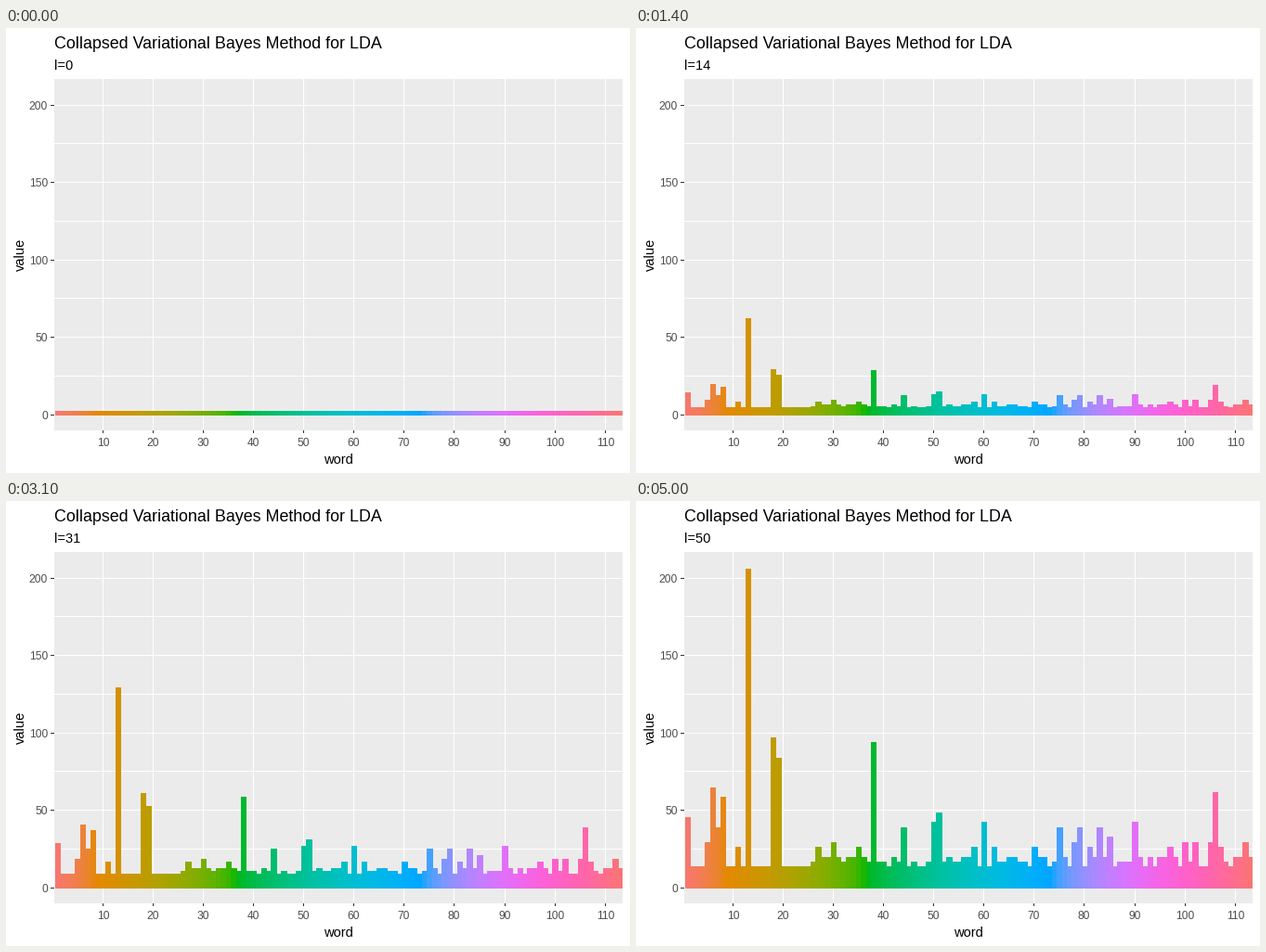
Write a matplotlib script that moves like this. It is 672x480 px and loops after 5.1 s.

```python
import numpy as np
import matplotlib.pyplot as plt
from matplotlib.animation import FuncAnimation
from matplotlib.patches import Rectangle

W, H, DPI = 672, 480, 96
LEFT, RIGHT, TOP, BOTTOM = 52, 664, 55, 434
ZERO_Y, UNIT = 417.2, 1.67
X0, STEP = 50.0, 5.4115
N, LAST = 113, 50

# Words that stand out, grouped by how often they occur
FREQUENT = {
    61: [13], 27: [18], 26: [38], 23: [19], 17: [6], 16: [106], 15: [8],
    12: [51], 11: [1], 10: [50, 60, 90], 9: [7, 44, 75, 79, 83], 7: [85],
    6: [5, 30, 78, 100, 102, 105, 112],
    5: [11, 27, 35, 58, 62, 70, 81, 97, 107],
}


def word_counts():
    """Rare words occur one to three times, the first ones only once."""
    rng = np.random.default_rng(4)
    counts = rng.integers(1, 4, N)
    counts[:25] = 1
    for count, words in FREQUENT.items():
        counts[np.array(words) - 1] = count
    return counts


COUNTS = word_counts()


def hcl(hue, chroma=100, lum=65):
    """Polar LUV to clipped sRGB."""
    h = np.radians(hue)
    y = ((lum + 16) / 116) ** 3
    u = chroma * np.cos(h) / (13 * lum) + 0.1978398
    v = chroma * np.sin(h) / (13 * lum) + 0.4683363
    x = 9 * y * u / (4 * v)
    z = -x / 3 - 5 * y + 3 * y / v
    rgb = np.array([
        3.240479 * x - 1.537150 * y - 0.498535 * z,
        -0.969256 * x + 1.875992 * y + 0.041556 * z,
        0.055648 * x - 0.204043 * y + 1.057311 * z,
    ])
    rgb = np.clip(rgb, 0, 1)
    return np.where(rgb > 0.00304, 1.055 * rgb ** (1 / 2.4) - 0.055, 12.92 * rgb)


def values(step):
    """A flat start, then steady growth in proportion to the counts."""
    if step == 0:
        return np.full(N, 2.6)
    base = 1.3 + 0.246 * step
    gain = 0.12 + 0.0593 * step + 0.00005 * step ** 2
    return base + gain * (COUNTS - 1)


def y_pos(value):
    return ZERO_Y - UNIT * value


plt.rcParams["font.family"] = "Liberation Sans"
fig = plt.figure(figsize=(W / DPI, H / DPI), dpi=DPI, facecolor="white")
ax = fig.add_axes([0, 0, 1, 1])
ax.set_xlim(0, W)
ax.set_ylim(H, 0)
ax.axis("off")


def box(x, y, w, h, color, z):
    return ax.add_patch(Rectangle((x, y), w, h, facecolor=color, linewidth=0,
                                  antialiased=False, zorder=z))


def label(x, y, text, size, color="black", ha="left", **kw):
    return ax.text(x, y, text, fontsize=size, color=color, ha=ha,
                   va="baseline", **kw)


GREY, DARK = "#4D4D4D", "#333333"
box(LEFT, TOP, RIGHT - LEFT, BOTTOM - TOP, "#EBEBEB", 1)

for val in range(0, 201, 25):
    row = int(y_pos(val))
    box(LEFT, row, RIGHT - LEFT, 1, "white", 2)
    if val % 50 == 0:
        box(LEFT - 4, row, 4, 1, DARK, 2)
        label(45, row + 5, str(val), 9, GREY, ha="right")

for word in range(10, 111, 10):
    col = int(X0 + STEP * word)
    box(col, TOP, 1, BOTTOM - TOP, "white", 2)
    box(col, BOTTOM, 1, 3, DARK, 2)
    label(col + 0.5, 451, str(word), 9, GREY, ha="center")

label(52, 22, "Collapsed Variational Bayes Method for LDA", 13.45)
label(358, 470, "word", 11, ha="center")
label(20, 244, "value", 11, ha="center", rotation=90, rotation_mode="anchor")
subtitle = label(52, 45, "l=0", 11)

# Each bar reaches one pixel over its right neighbour
edges = np.round(X0 + STEP * (np.arange(N + 1) + 0.5))
bars = []
for i in range(N):
    right = min(edges[i + 1] + 1, RIGHT)
    bars.append(box(edges[i], 413, right - edges[i], 5,
                    tuple(hcl(15 + 360 * i / N)), 3))


def draw(step):
    for bar, top in zip(bars, np.round(y_pos(values(step)))):
        bar.set_y(top)
        bar.set_height(418 - top)
    subtitle.set_text(f"l={step}")
    return bars + [subtitle]


anim = FuncAnimation(fig, draw, frames=LAST + 1, interval=100,
                     repeat=True, repeat_delay=0, blit=False)
plt.show()
```
